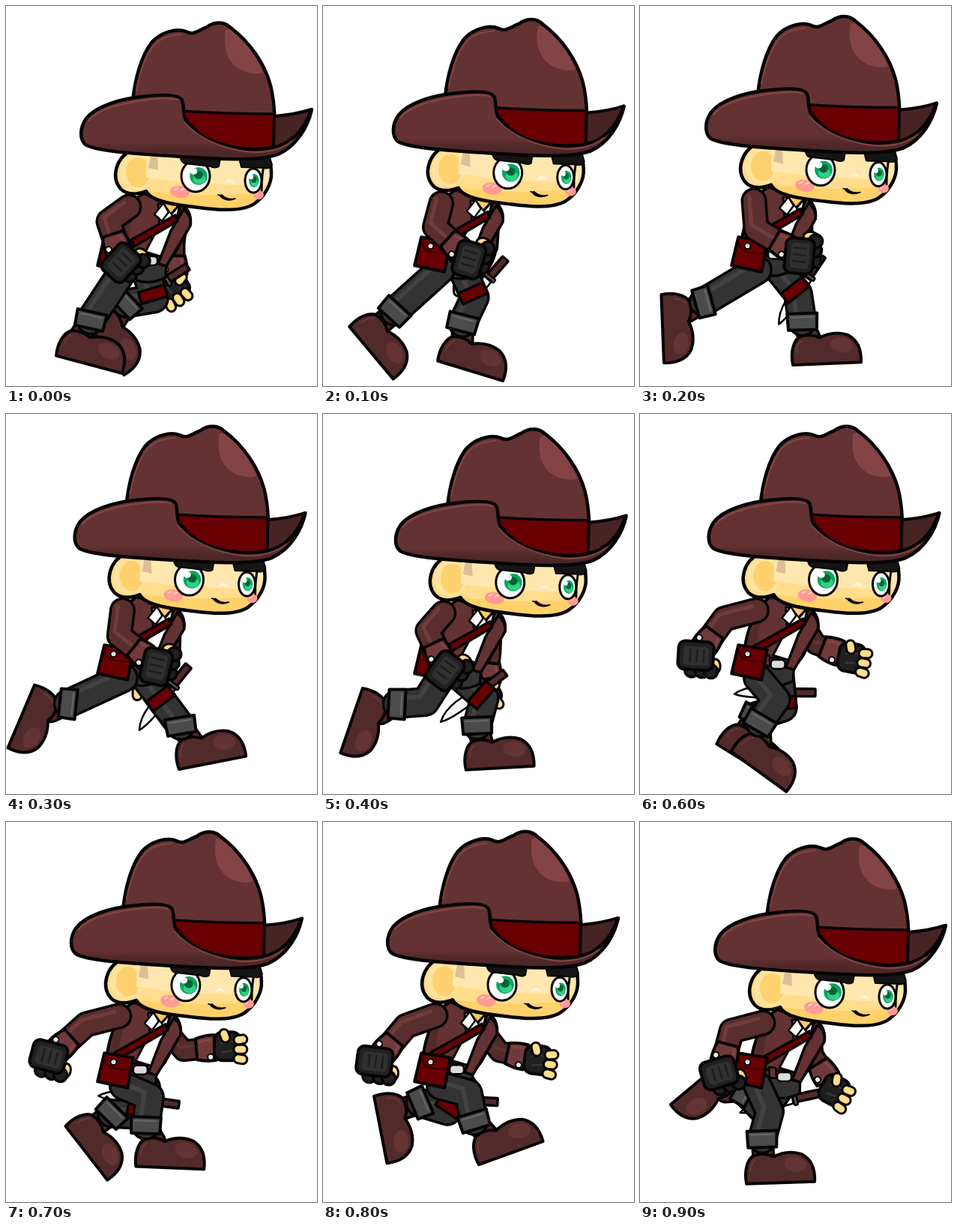
Animation of 415 by 507 pixels, one loop 1 s. Source, as an HTML page with a canvas:

```html
<!DOCTYPE html>
<html lang="en">
<head>
<meta charset="utf-8">
<title>Running adventurer</title>
<style>
  html, body { margin: 0; width: 100%; height: 100%; overflow: hidden; background: #fff; }
  canvas { display: block; width: 415px; height: 507px; }
</style>
</head>
<body>
<canvas id="stage" width="415" height="507"></canvas>
<script>
const ctx = document.getElementById('stage').getContext('2d');
const STEP = 100, STEPS = 10, RAD = Math.PI / 180;
const INK = '#060404', SKIN = '#ffdd8c', LEATHER = '#532a2a', FELT = '#643232',
      GLOSS = '#824444', CLOTH = '#333', RED = '#690003', GLOVE = '#202020';

// Key poses as [step, ...values], joined by a closed smooth curve
const sway = [[0, 0], [2, -12], [3, -8.5], [5, 0], [6, -8.5], [8, -14], [9, 0]];
// Ankle x, y and boot angle
const nearStride = [[0, 99, 440, 15], [3, 60, 397, 113], [5, 110, 412, 85],
                    [6, 161, 437, 36], [8, 219, 417, -20], [9, 165, 448, -2]];
const farStride = [[0, 147, 418, 55], [1, 186, 448, 17], [3, 248, 436, -11],
                   [5, 166, 439, 14], [8, 106, 383, 79], [9, 114, 360, 140]];

function pose(keys, t) {
  const n = keys.length;
  const key = k => {
    const lap = Math.floor(k / n), [time, ...v] = keys[k - lap * n];
    return { time: time + lap * STEPS, v };
  };
  const i = keys.findLastIndex(k => k[0] <= t);
  const [a, b, c, d] = [-1, 0, 1, 2].map(k => key(i + k));
  const h = c.time - b.time, u = (t - b.time) / h;
  return b.v.map((p, j) => {
    const q = c.v[j];
    const m = (q - a.v[j]) / (c.time - a.time) * h;
    const s = (d.v[j] - p) / (d.time - b.time) * h;
    return p + (q - p) * u * u * (3 - 2 * u) + u * (1 - u) * (m * (1 - u) - s * u);
  });
}

// The point at a given distance from a, in the direction of b
function toward(a, b, dist) {
  const len = Math.hypot(b[0] - a[0], b[1] - a[1]) || 1;
  return [a[0] + (b[0] - a[0]) / len * dist, a[1] + (b[1] - a[1]) / len * dist];
}

// Middle joint of two equal bones, bent forward
function knee(hip, foot, bone) {
  const dx = foot[0] - hip[0], dy = foot[1] - hip[1], d = Math.hypot(dx, dy);
  const h = Math.sqrt(Math.max(0, bone * bone - d * d / 4)) / d;
  return [hip[0] + dx / 2 + dy * h, hip[1] + dy / 2 - dx * h];
}

const angle = (a, b) => Math.atan2(b[1] - a[1], b[0] - a[0]) / RAD;

function at(x, y, deg, draw) {
  ctx.save();
  ctx.translate(x, y);
  ctx.rotate(deg * RAD);
  draw();
  ctx.restore();
}

function paint(path, fill, width, ink = INK) {
  if (fill) { ctx.fillStyle = fill; ctx.fill(path); }
  if (width) { ctx.lineWidth = width; ctx.strokeStyle = ink; ctx.stroke(path); }
}

function shape(d, fill, width = 4, ink = INK) {
  paint(new Path2D(d), fill, width, ink);
}

function oval(x, y, rx, ry, fill, width = 0, deg = 0) {
  const p = new Path2D();
  p.ellipse(x, y, rx, ry, deg * RAD, 0, 7);
  paint(p, fill, width);
}

function box(x, y, w, h, r, fill, width = 4) {
  const p = new Path2D();
  p.roundRect(x, y, w, h, r);
  paint(p, fill, width);
}

// A round-ended chain of bones with an outline and a sheen
function limb(points, w, fill, sheen) {
  const p = new Path2D();
  points.forEach(([x, y]) => p.lineTo(x, y));
  paint(p, null, w + 7);
  paint(p, null, w, fill);
  if (sheen) at(-w * .22, -w * .2, 0, () => paint(p, null, w * .18, sheen));
}

function boot(ankle, deg) {
  at(...ankle, deg, () => at(-24, 34, 0, () => {
    shape('M0 0 C-3 -17 2 -32 10 -37 Q24 -42 37 -35 Q57 -44 75 -37 Q93 -27 91 0 Z', LEATHER);
    oval(66, -24, 15, 10, '#643434', 0, 12);
    shape('M6 -16 Q6 -27 13 -32', null, 2, '#6a3939');
  }));
}

function leg(hip, stride, t, strap) {
  const [x, y, turn] = pose(stride, t);
  const ankle = [x, y], cuff = toward(ankle, hip, 25), bend = knee(hip, cuff, 38);
  limb([cuff, ankle], 24, LEATHER);
  boot(ankle, turn);
  limb([hip, bend, cuff], 33, CLOTH, '#424242');
  at(...cuff, turn * .85, () => {
    shape('M-20 -11 L20 -11 L19 11 L-19 11 Z', '#4b4b4b');
    shape('M-15 -6 L14 -6', null, 2, '#686868');
  });
  if (strap) {
    at(...toward(hip, bend, 32), angle(hip, bend) - 90,
      () => shape('M-18 -8 L18 -8 L18 8 L-18 8 Z', RED, 3.5));
  }
}

function sleeve(elbow, pos) {
  at(...pos, angle(elbow, pos), () => {
    shape('M-13 -14 Q0 -18 12 -17 Q16 0 12 17 Q0 18 -13 14 Z', '#713a3a');
    shape('M-8 -9 Q0 -12 7 -11', null, 3, GLOSS);
    oval(5, 12, 4, 4, '#eee', 2);
  });
}

// w is the arm swing: 1 is the near hand fully forward, -1 fully back
function drawFarArm(w, dx, dy) {
  const elbow = [227 - 10 * w, 314 + 9 * w];
  const hand = [239 - 58 * w, 374 + 22 * w - 53 * w * w];
  const cuff = toward(hand, elbow, 30);
  limb([[228 + dx, 288 + dy], elbow, cuff], 23, LEATHER, FELT);
  sleeve(elbow, cuff);
  at(...hand, 45 + 45 * w, () => {
    box(-19, -19, 35, 38, 11, GLOVE);
    shape('M-10 -4 Q-2 -10 5 -6 M-8 8 L4 6', null, 2, '#3b3b3b');
    const finger = (x, y, deg) => at(x, y, deg, () => box(-9, -6, 18, 12, 6, SKIN, 3));
    for (const k of [1, 0, -1]) finger(16, 4 + 13 * k, 8 * k);
    finger(-5, -14, 70);
  });
}

function drawNearArm(w, dx, dy) {
  const shoulder = [164 + dx, 268 + dy];
  const elbow = [131 + 24 * w, 284 + 14 * w];
  const hand = [136 + 78 * w, 341 + 9 * w - 18 * w * w];
  const cuff = toward(hand, elbow, 27);
  limb([shoulder, elbow, cuff], 28, '#5b2e2e', '#713c3c');
  sleeve(elbow, cuff);
  at(...hand, -35 - 50 * w, () => {
    oval(25, 12, 7, 10, SKIN, 3);
    for (const x of [-6, 8, 20]) oval(x, 19, 9, 9, GLOVE, 3.5);
    box(-25, -20, 47, 38, 9, GLOVE);
    box(-18, -13, 34, 25, 5, '#303030', 0);
    for (const x of [-9, 0, 9]) shape(`M${x} -9 V7`, null, 2.5, '#1d1d1d');
  });
}

function drawDagger(w) {
  at(213 + 13 * w, 366 - 7 * w, -24 - 32 * w, () => {
    shape('M-5 -6 L-45 -7 Q-65 -6 -77 3 Q-58 10 -5 6 Z', '#f7f7f7', 2.5);
    box(0, -5, 31, 10, 1, LEATHER, 3.5);
    box(-4, -9, 5, 18, 2, '#555', 2.5);
  });
}

function drawTorso() {
  shape('M183 250 C164 261 151 292 147 326 L168 341 L214 344 L225 330 L246 292 Q248 277 237 266 Z', FELT);
  shape('M176 262 C160 280 153 300 151 325 L162 332 Q164 296 176 262 Z', LEATHER, 0);
  shape('M166 330 L214 334 L213 362 Q188 375 166 362 Z', CLOTH, 3.5);
  shape('M203 264 L233 267 L226 290 L209 335 L186 328 L205 292 Z', '#fff', 3);
  shape('M209 262 L232 264 L220 277 Z', '#ffca62', 2);
  shape('M198 278 L210 263 L217 275 L208 287 Z', '#fff', 2.5);
  shape('M232 265 L221 278 L226 289 Z', '#fff', 2.5);
  shape('M237 271 Q248 280 246 293 L214 347 L203 344 L220 300 Z', FELT, 3.5);
  shape('M172 327 L181 328 L182 342 L173 341 Z', FELT, 2.5);
  shape('M226 279 L229 287 L164 325 L158 317 Z', RED, 3.5);
  box(183, 334, 19, 12, 5, '#dcdcdc', 2.5);
}

function drawBag() {
  at(147, 330, 9, () => {
    shape('M-19 -19 L20 -19 L19 22 L-22 20 Z', RED);
    shape('M-18 -17 Q-17 -2 -4 -1 L18 -2', null, 2, '#370000');
    oval(-5, -9, 4, 4, '#e8e8e8', 2);
  });
}

function eye(x, y, rx, ry, shift) {
  oval(x, y, rx, ry, '#fff', 3);
  const r = rx * .62, s = ry * .56, cx = x + shift;
  oval(cx, y, r, s, '#08a65c');
  oval(cx + 1, y + s * .35, r * .7, s * .55, '#2fd184');
  oval(cx, y - s * .15, r * .5, s * .48, '#06623a');
  oval(cx - r * .55, y - s * .55, r * .4, s * .36, '#fff');
}

function drawFace() {
  const face = new Path2D('M168 192 C146 203 140 229 153 244 C162 253 176 251 187 247 ' +
    'C194 262 232 266 258 269 C287 273 316 274 331 264 C346 254 355 236 354 222 Q354 210 349 200 Z');
  ctx.save();
  ctx.clip(face);
  paint(face, SKIN);
  oval(174, 222, 22, 24, '#ffe3a0');
  oval(176, 222, 16, 20, '#ffd06e');
  shape('M188 190 L360 190 L350 240 Q270 240 187 229 Z', '#ffe7af', 0);
  shape('M182 246 Q255 257 344 249 L330 280 L180 270 Z', '#ffd16a', 0);
  shape('M193 200 L202 200 L203 219 L190 216 Z', '#dcbf96', 0);
  ctx.restore();
  paint(face, null, 4.5);
  shape('M341 247 Q341 225 345 208', null, 3);
  oval(232, 248, 13, 8, '#ff9a94', 0, 8);
  oval(337, 252, 7, 6, '#ff9a94');
  shape('M225 245 l4 -2 M233 246 l4 -2 M333 251 l3 -2', null, 2, '#ffd0c8');
  eye(253, 227, 19, 21, 4);
  eye(330, 233, 11, 16, 1);
  shape('M291 237 Q298 225 306 237 Q298 233 291 237 Z', '#fff4d8', 0);
  shape('M283 252 Q286 253 288 252 Q295 259 306 257 Q294 262 286 254', INK, 1.5);
  shape('M232 199 L286 203 L284 214 Q280 217 273 214 L238 210 Q233 208 232 199 Z', '#151515', 2);
  shape('M311 203 L352 202 L355 212 Q351 218 344 216 L314 215 Z', '#151515', 2);
}

function drawHat() {
  shape('M169 128 C172 96 181 66 194 49 C206 35 228 29 240 34 C250 40 257 32 268 28 ' +
    'C279 20 292 21 300 29 C325 48 345 76 353 106 C359 130 360 158 357 192 L245 185 Z', FELT, 4.5);
  shape('M293 32 C289 58 296 78 317 87 Q331 92 343 89 C335 67 319 47 301 33 Q297 30 293 32 Z', '#844446', 0);
  shape('M174 112 Q182 70 198 52 Q210 39 234 38', null, 2, GLOSS);
  shape('M234 140 Q293 144 358 144 L357 193 C315 198 265 187 238 148 Z', RED, 3.5);
  shape('M358 147 Q385 145 407 138 C401 159 390 178 374 187 L357 192 Z', '#482324');
  const shade = ctx.createLinearGradient(0, 150, 0, 204);
  shade.addColorStop(.58, FELT);
  shade.addColorStop(.72, '#552a2a');
  shade.addColorStop(1, '#482424');
  shape('M235 126 C231 117 206 118 181 121 C151 124 120 134 107 150 C98 163 98 178 106 185 ' +
    'C119 194 180 198 250 202 C301 205 341 206 363 198 C388 187 403 161 408 138 ' +
    'C398 165 380 185 355 189 C320 195 274 187 248 163 C233 149 239 137 235 126 Z', shade, 4.5);
  shape('M110 153 Q125 134 182 126 Q218 121 229 125', null, 2.5, GLOSS);
  shape('M238 155 Q265 187 325 195 Q360 197 382 180', null, 2, GLOSS);
}

function render(t) {
  ctx.fillStyle = '#fff';
  ctx.fillRect(0, 0, 415, 507);
  ctx.lineCap = ctx.lineJoin = 'round';
  const w = Math.cos((t - 2.1) / STEPS * 2 * Math.PI);
  const [dx] = pose(sway, t), dy = dx * .7;
  drawFarArm(w, dx, dy);
  drawDagger(w);
  leg([187, 354], farStride, t, true);
  at(dx, dy, 0, drawTorso);
  leg([157, 352], nearStride, t, false);
  drawBag();
  drawNearArm(w, dx, dy);
  at(dx, dy, 0, () => { drawFace(); drawHat(); });
}

let shown = -1;
function tick() {
  const t = Math.floor(performance.now() / STEP) % STEPS;
  if (t !== shown) render(shown = t);
  requestAnimationFrame(tick);
}
tick();
</script>
</body>
</html>
```
